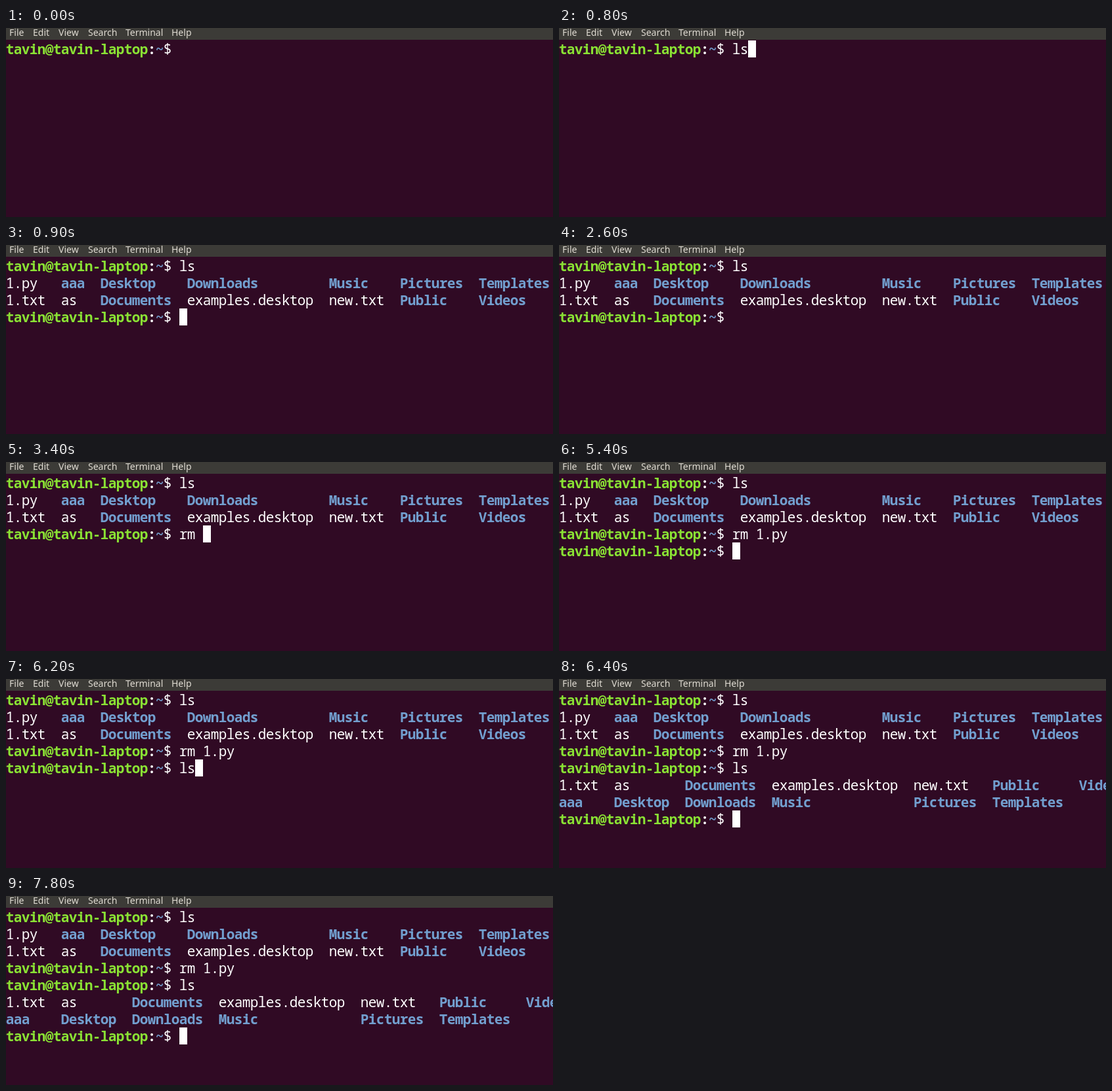
An HTML page that plays this animation: 833 px wide and 289 px high, repeating every 8000 ms.

```html
<!DOCTYPE html>
<html lang="en">
<head>
<meta charset="utf-8">
<title>Terminal</title>
<style>
  html, body { margin: 0; width: 100%; height: 100%; overflow: hidden; background: #300a24; }
  svg { display: block; }
  text { white-space: pre; }
  .menu { font: 14px "Noto Sans", "Open Sans", sans-serif; fill: #dfdbd2; }
  .cell {
    font: 500 21px "Noto Sans Mono", "DejaVu Sans Mono", monospace;
    letter-spacing: -0.6px;
    fill: #fff;
  }
  .user, .dir, .bold { font-weight: 700; }
  .user { fill: #8ae234; }
  .dir { fill: #729fcf; }
</style>
</head>
<body>
<svg id="stage" width="833" height="289" viewBox="0 0 833 289">
  <rect width="833" height="289" fill="#300a24"/>
  <rect width="833" height="18" fill="#3c3b37"/>
</svg>
<script>
const LOOP = 8000, CELL = 12, LINE = 26, TOP = 19, BASE = 21;
const PROMPT_COLS = 22;
const stage = document.getElementById('stage');
const timed = [];

function add(tag, attrs, content = '') {
  const el = document.createElementNS('http://www.w3.org/2000/svg', tag);
  for (const key in attrs) el.setAttribute(key, attrs[key]);
  el.textContent = content;
  stage.appendChild(el);
  return el;
}

function put(from, row, col, content, kind = '') {
  const el = add('text', {
    x: col * CELL - 0.3, y: TOP + row * LINE + BASE, class: 'cell ' + kind
  }, content);
  timed.push({ el, from });
}

function prompt(from, row) {
  put(from, row, 0, 'tavin@tavin-laptop', 'user');
  put(from, row, 18, ':', 'bold');
  put(from, row, 19, '~', 'dir');
  put(from, row, 20, '$');
}

// Names starting with a capital, and "aaa", are directories.
function listing(from, row, cols, names) {
  names.split(' ').forEach((name, i) =>
    put(from, row, cols[i], name, /^[A-Z]|^aaa$/.test(name) ? 'dir' : ''));
}

// Cursor steps: [time, row, column]; column -1 hides it.
const cursorSteps = [[0, 0, -1]];

function blink(row, col, ...times) {
  times.forEach((time, i) => cursorSteps.push([time, row, i % 2 ? -1 : col]));
}

function type(row, command, times) {
  times.forEach((time, i) => {
    put(time, row, PROMPT_COLS + i, command[i]);
    blink(row, PROMPT_COLS + i + 1, time);
  });
}

[['File', 5], ['Edit', 41], ['View', 80], ['Search', 125], ['Terminal', 182], ['Help', 252]]
  .forEach(([label, x]) => add('text', { x, y: 12, class: 'menu' }, label));

const wide = [0, 7, 12, 23, 41, 50, 60];
const narrow = [0, 7, 16, 27, 45, 55, 66];

prompt(0, 0);
blink(0, PROMPT_COLS, 500);
type(0, 'ls', [700, 800]);

listing(900, 1, wide, '1.py aaa Desktop Downloads Music Pictures Templates');
listing(900, 2, wide, '1.txt as Documents examples.desktop new.txt Public Videos');
prompt(900, 3);
blink(3, PROMPT_COLS, 900, 1500, 2000, 2600);
type(3, 'rm 1.py', [2900, 3000, 3400, 3700, 3900, 4200, 4400]);
cursorSteps.push([5000, 3, -1]);

prompt(5400, 4);
blink(4, PROMPT_COLS, 5400, 5900);
type(4, 'ls', [6100, 6200]);

listing(6400, 5, narrow, '1.txt as Documents examples.desktop new.txt Public Videos');
listing(6400, 6, narrow, 'aaa Desktop Downloads Music Pictures Templates');
prompt(6400, 7);
blink(7, PROMPT_COLS, 6400, 7000, 7500);

const cursor = add('rect', { width: CELL, height: LINE, fill: '#fff' });

function draw() {
  const t = performance.now() % LOOP;
  for (const { el, from } of timed) {
    el.setAttribute('visibility', t >= from ? 'visible' : 'hidden');
  }
  const [, row, col] = cursorSteps.filter(step => step[0] <= t).pop();
  cursor.setAttribute('x', col * CELL);
  cursor.setAttribute('y', TOP + row * LINE);
  cursor.setAttribute('visibility', col < 0 ? 'hidden' : 'visible');
  requestAnimationFrame(draw);
}
draw();
</script>
</body>
</html>
```
